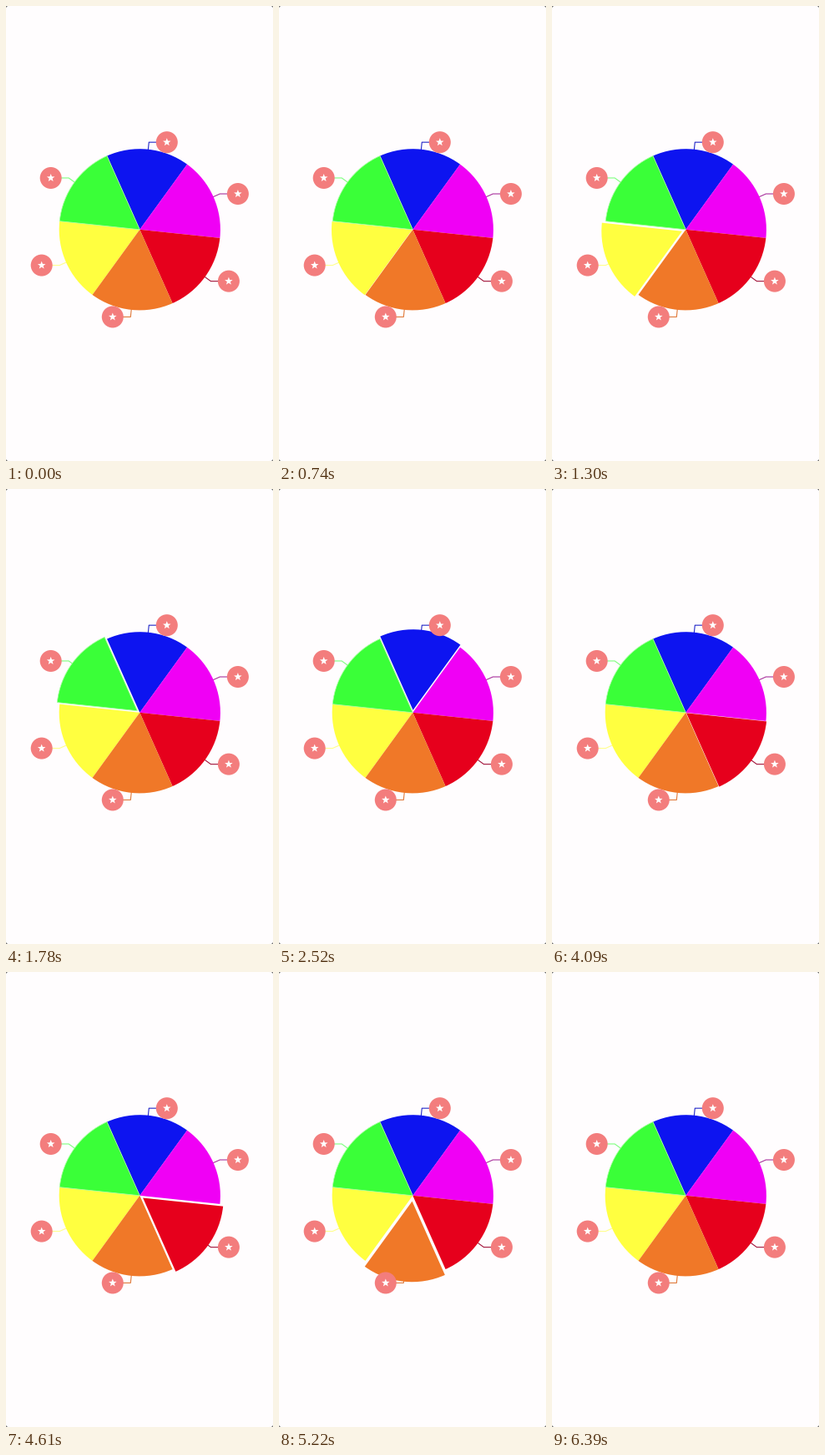
A matplotlib script that plays this animation: 320 by 545 pixels, repeating every 6.43 s.

```python
import numpy as np
import matplotlib.pyplot as plt
from matplotlib.animation import FuncAnimation
from matplotlib.patches import Circle, Polygon, Wedge

W, H, DPI = 320, 545, 100
LOOP, FRAMES = 6430, 148
STEP = LOOP / FRAMES
CX, CY = 160.3, 267.8
RADIUS, ELBOW, ARM = 96.6, 105.2, 21.5
POP_MS, SPEED = 800, 0.02   # slide out and back, px per ms
PX = 72 / DPI

# mid angle, fill, edge, leader, pop start in ms
SLICES = [
    (204, "#ffff40", "none", "#ffff8c", 700),
    (144, "#3aff38", "#a8ffa0", "#7dff7d", 1560),
    (84, "#0d14f0", "none", "#2026c8", 2370),
    (24, "#f000f5", "none", "#a8309c", 3170),
    (324, "#e6001c", "none", "#a01038", 4040),
    (264, "#f07828", "none", "#e07838", 4870),
]

fig = plt.figure(figsize=(W / DPI, H / DPI), dpi=DPI, facecolor="#fffdfe")
ax = fig.add_axes([0, 0, 1, 1])
ax.set_xlim(-CX, W - CX)
ax.set_ylim(CY - H, CY)
ax.axis("off")


def polar(r, deg):
    a = np.radians(deg)
    return r * np.array([np.cos(a), np.sin(a)])


def add_star(center, size):
    pts = [center + polar(size if k % 2 == 0 else size * 0.42, 90 + 36 * k)
           for k in range(10)]
    ax.add_patch(Polygon(pts, fc="white", ec="none", zorder=5))


def add_label(angle, color):
    start, bend = polar(RADIUS - 1, angle), polar(ELBOW, angle)
    center = bend + [ARM * np.sign(bend[0]), 0]
    ax.plot(*zip(start, bend, center), color=color, lw=1.1 * PX, zorder=1)
    ax.add_patch(Circle(center, 13, fc="#f37d7d", ec="none", zorder=4))
    add_star(center, 5)


def add_corners():
    for x, sx in ((-CX, 1), (W - CX, -1)):
        for y, sy in ((CY, -1), (CY - H, 1)):
            pts = [(x, y), (x + 2 * sx, y), (x, y + 2 * sy)]
            ax.add_patch(Polygon(pts, fc="#707070", ec="none"))


def pop(t, start):
    age = t - start
    return SPEED * max(0, min(age, POP_MS - age))


add_corners()
wedges = []
for angle, fill, edge, leader, _ in SLICES:
    add_label(angle, leader)
    wedge = Wedge((0, 0), RADIUS, angle - 30, angle + 30, fc=fill, ec=edge,
                  lw=0.8 * PX, zorder=3 if edge != "none" else 2)
    wedges.append(ax.add_patch(wedge))


def update(i):
    t = i * STEP
    for wedge, (angle, *_, start) in zip(wedges, SLICES):
        wedge.set_center(polar(pop(t, start), angle))
    return wedges


anim = FuncAnimation(fig, update, frames=FRAMES, interval=STEP,
                     init_func=lambda: update(0), repeat=True,
                     repeat_delay=0, blit=False)
plt.show()
```
